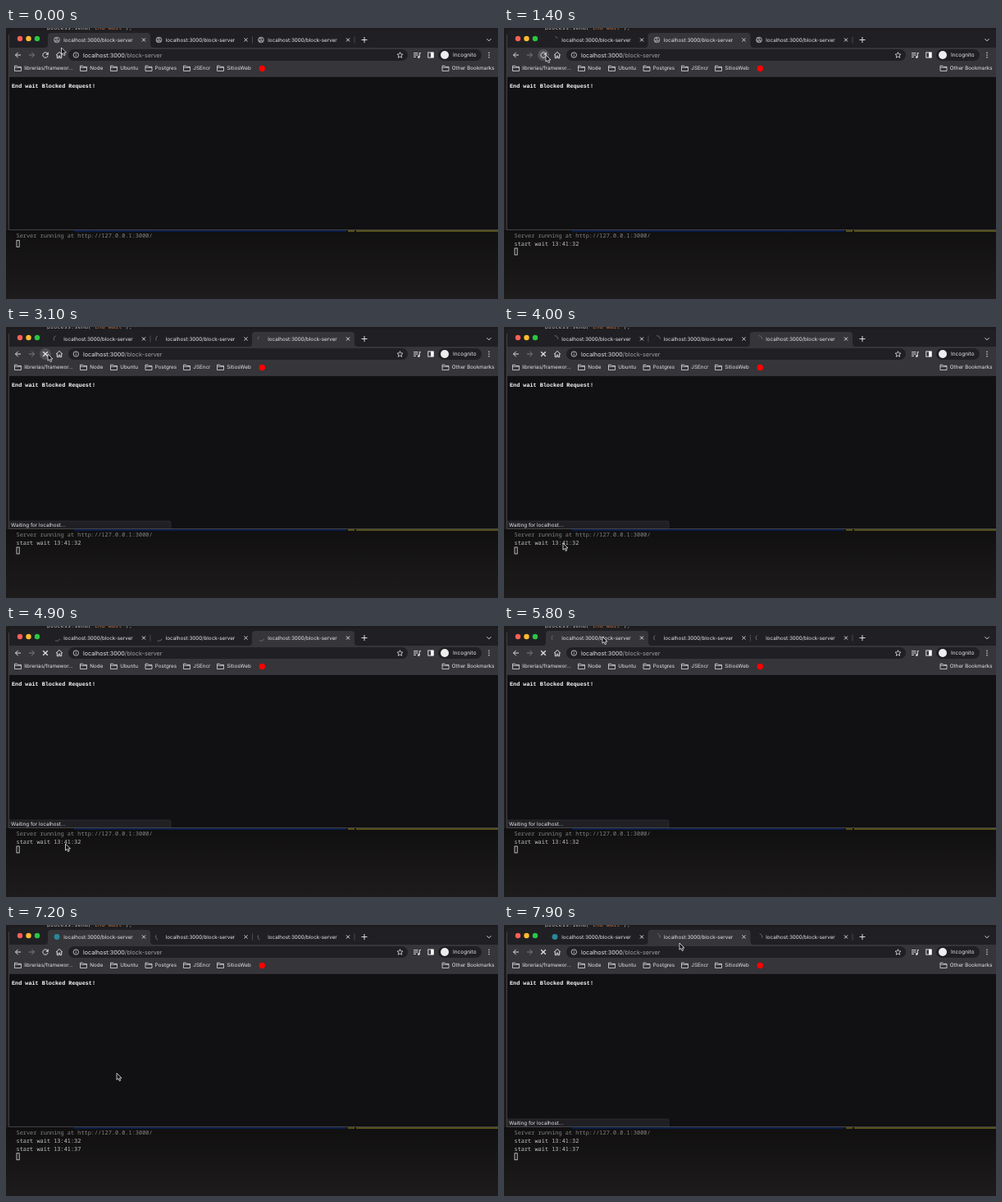
An HTML page that plays this animation: 600x331 px, repeating every 8000 ms.

```html
<!DOCTYPE html>
<html lang="en">
<head>
<meta charset="utf-8">
<title>Blocked requests</title>
<style>
  html, body { margin: 0; width: 100%; height: 100%; overflow: hidden; background: #1c1a1b; }
  svg { display: block; width: 100vw; height: 100vh; }
  text { font: 6.3px Inter, sans-serif; fill: #e6e6e8; white-space: pre; text-rendering: geometricPrecision; }
  .url { font-size: 7.2px; }
  .chip { font-size: 6.5px; }
  .page { font: bold 6.8px "Liberation Mono", monospace; fill: #fff; }
  .term { font: 6.93px "Noto Sans Mono", monospace; fill: #c4c2c3; }
  .line { fill: none; stroke: #dcdde0; stroke-width: 1; }
  .thin { stroke-width: .8; }
  .dim { stroke: #7c7d82; }
</style>
</head>
<body>
<svg viewBox="0 0 600 331" preserveAspectRatio="none">
  <defs>
    <linearGradient id="shade" x2="0" y2="1">
      <stop offset="0" stop-color="#000" stop-opacity=".42"/>
      <stop offset="1" stop-color="#000" stop-opacity="0"/>
    </linearGradient>
    <g id="folder">
      <path class="line thin" d="M.5 1.2h3l1 1.2h4v5.1h-8z"/>
      <path class="line thin" d="M.5 3.2h8"/>
    </g>
    <g id="globe">
      <circle r="3.8" fill="#8d9095"/>
      <path d="M-2.7-1.6 0-.7-.8.7-2 .6zM.7-2.7 2.7-1 2.2 1 .9.3zM-.7 1.3 1.3 1.7.3 3.1z" fill="#333439"/>
    </g>
    <path id="cross" class="line" d="M-2-2 2 2M2-2-2 2"/>
  </defs>

  <rect width="600" height="331" fill="#1d1b1c"/>
  <text class="term" x="50" y="2.4">process.send(<tspan fill="#b9754a">'End wait'</tspan>);</text>
  <rect y="247" width="600" height="84" fill="url(#shade)"/>
  <path d="M83 248H415" stroke="#0a1e4a" stroke-width="2"/>
  <path d="M417 248h8M427 248H600" stroke="#555019" stroke-width="2"/>
  <g id="terminal">
    <text class="term" x="12.5" y="256.3" style="fill:#858384">Server running at http://127.0.0.1:3000/</text>
    <text class="term" id="first" x="12.5" y="266.2">start wait 13:41:32</text>
    <text class="term" id="second" x="12.5" y="275.9">start wait 13:41:37</text>
    <rect id="caret" x="13" width="3.2" height="8" class="line thin"/>
  </g>

  <path d="M3.5 247V7q0-4.5 4.5-4.5H600V247z" fill="#202024"/>
  <g id="tabs"></g>
  <circle cx="17" cy="13" r="3.2" fill="#ff5f57"/>
  <circle cx="27.5" cy="13" r="3.2" fill="#febc2e"/>
  <circle cx="38" cy="13" r="3.2" fill="#28c840"/>
  <path class="line" d="M433.5 14.5h7M437 11v7M586.5 13.3l2.5 2.5 2.5-2.5"/>

  <rect x="4" y="24" width="596" height="35" fill="#35353a"/>
  <rect x="76" y="26" width="414" height="14" rx="7" fill="#202024"/>
  <rect x="527" y="26" width="53" height="14" rx="7" fill="#202024"/>
  <circle id="hover" cx="48" cy="33" r="7" fill="#515156"/>
  <path class="line" d="M18 33h-6.5m3.2-3.2L11.5 33l3.2 3.2"/>
  <path class="line dim" d="M28 33h6.5m-3.2-3.2 3.2 3.2-3.2 3.2"/>
  <g id="reload">
    <path class="line" d="M50.7 31.2A3.2 3.2 0 1 0 51.2 33.8"/>
    <path d="M51.8 29.3v3.5h-3.5z" fill="#dcdde0"/>
  </g>
  <use id="stop" href="#cross" transform="translate(48 33) scale(1.4)"/>
  <path class="line" d="M61 33.2 65 29.4l4 3.8M62.3 32.5v4.2h1.9v-2.5h1.6v2.5h1.9v-4.2"/>
  <circle class="line thin" cx="85.3" cy="33" r="3.2"/>
  <path class="line thin" d="M85.3 32.6v2.1M85.3 31.1v.8"/>
  <text class="url" x="94" y="35.5">localhost:3000<tspan fill="#a0a1a6">/block-server</tspan></text>
  <path class="line thin" d="M480.5 29.6l1 2.3 2.5.2-1.9 1.7.6 2.5-2.2-1.4-2.2 1.4.6-2.5-1.9-1.7 2.5-.2z"/>
  <path class="line" d="M497 30.7h5.5M497 33h5.5M497 35.3h3M504.3 35.6v-5h1.7"/>
  <circle cx="503.3" cy="35.6" r="1.3" fill="#dcdde0"/>
  <rect class="line" x="514.8" y="29.9" width="6.4" height="6.2"/>
  <rect x="518" y="29.9" width="3.4" height="6.2" fill="#fff"/>
  <circle cx="535" cy="33" r="5" fill="#eceded"/>
  <text class="chip" x="545" y="35.4">Incognito</text>
  <g fill="#dcdde0"><circle cx="589" cy="30.2" r=".8"/><circle cx="589" cy="33" r=".8"/><circle cx="589" cy="35.8" r=".8"/></g>
  <g id="bookmarks"></g>
  <circle cx="312.3" cy="49.5" r="3.7" fill="#f00"/>

  <rect x="4" y="59" width="596" height="187" fill="#111012"/>
  <path d="M4 59.3H600" stroke="#49494e" stroke-width=".7"/>
  <text class="page" x="7" y="72.7">End wait Blocked Request!</text>
  <g id="status">
    <path d="M4 237H199q2 0 2 2v7.5H4z" fill="#202024" stroke="#37373b" stroke-width=".6"/>
    <text x="6" y="244">Waiting for localhost...</text>
  </g>
  <path d="M3.5 8V246.5H600" fill="none" stroke="#4c4b4f" stroke-width=".8"/>
  <path id="pointer" d="M0 0V8.2L1.9 6.5 3.2 9.5 4.7 8.9 3.4 6H6z" fill="#111" stroke="#eee" stroke-width=".8"/>
</svg>
<script>
const LOOP = 8000, STEP = 100;
const $ = id => document.getElementById(id);

const bookmarks = [[10, "librerias/framewor..."], [90, "Node"], [127, "Ubuntu"], [169.5, "Postgres"],
  [216, "JSEncr"], [257, "SitiosWeb"], [531.5, "Other Bookmarks"]];
$("bookmarks").innerHTML = bookmarks.map(([x, label]) =>
  `<use href="#folder" x="${x}" y="45"/><text x="${x + 12.3}" y="51.4">${label}</text>`).join("");

$("tabs").innerHTML = [0, 1, 2].map(i => `<g transform="translate(${51 + i * 124.5})">
  <path class="shape" d="M-4 24q4 0 4-4V10q0-4 4-4H121q4 0 4 4v10q0 4 4 4z" fill="#35353a"/>
  <path class="edge" d="M125 10.5v8" stroke="#55555a" stroke-width=".8"/>
  <use class="globe" href="#globe" x="11" y="14.5"/>
  <circle class="done" cx="11" cy="14.5" r="3.4" fill="#2c8798"/>
  <path class="spinner" fill="none" stroke-width="1"/>
  <text x="19.2" y="16.7">localhost:3000/block-server</text>
  <use href="#cross" x="117" y="14.5"/></g>`).join("");

const tabs = [...$("tabs").children].map((group, i) => ({
  part: Object.fromEntries(["shape", "edge", "globe", "done", "spinner"].map(c => [c, group.querySelector("." + c)])),
  start: [1000, 1700, 2600][i],
  end: [6200, LOOP, LOOP][i]
}));

// Pointer path: time, x, y
const path = [[0, 67.5, 24], [100, 67.5, 24], [700, 51, 33], [3100, 51, 33], [3500, 80, 296],
  [3700, 80, 290], [4000, 72, 264], [4400, 88, 265], [4800, 72, 266], [5100, 74, 266],
  [5600, 119, 14], [5800, 120, 13], [6300, 82, 264], [6700, 82, 265], [7000, 90, 264],
  [7500, 218, 28], [7700, 222, 16], [7900, 214, 22], [LOOP, 214, 22]];

const show = (el, on) => el.setAttribute("visibility", on ? "visible" : "hidden");
const within = (t, a, b) => t >= a && t < b;

function pointerAt(t) {
  const i = path.findIndex(p => p[0] > t);
  const [t0, x0, y0] = path[i - 1], [t1, x1, y1] = path[i];
  const k = (t - t0) / (t1 - t0), e = k * k * (3 - 2 * k);
  return [x0 + (x1 - x0) * e, y0 + (y1 - y0) * e];
}

function arc(middle, sweep) {
  const point = a => {
    const r = a * Math.PI / 180;
    return `${11 + 3.8 * Math.sin(r)} ${14.5 - 3.8 * Math.cos(r)}`;
  };
  return `M${point(middle - sweep / 2)}A3.8 3.8 0 0 1 ${point(middle + sweep / 2)}`;
}

function activeAt(t) {
  if (t < 1300) return 0;
  if (t < 2300) return 1;
  if (t < 5600) return 2;
  return t < 7700 ? 0 : 1;
}

function draw(t) {
  const active = activeAt(t);
  const receiving = within(t, 6200, 6700);
  const angle = receiving ? 260 + (t - 6400) * .3 : -70 - 360 * (t - 3100) / 1320;

  tabs.forEach(({ part, start, end }, i) => {
    const loading = within(t, start, end);
    show(part.shape, i === active);
    show(part.edge, i !== active && i + 1 !== active);
    show(part.globe, t < start);
    show(part.done, t >= end);
    show(part.spinner, loading);
    part.spinner.setAttribute("d", arc(angle, Math.min(100, 20 + (t - start) / 12)));
    part.spinner.setAttribute("stroke", receiving ? "#4c86b0" : "#696a70");
  });

  const busy = within(t, tabs[active].start, tabs[active].end);
  show($("stop"), busy);
  show($("reload"), !busy);
  show($("status"), within(t, 1900, 2300) || within(t, 2800, 6700) || t >= 7700);
  show($("first"), t >= 1300);
  show($("second"), t >= 6200);
  $("caret").setAttribute("y", t < 1300 ? 259.3 : t < 6200 ? 269 : 278.8);

  const [x, y] = pointerAt(t);
  $("pointer").setAttribute("transform", `translate(${x} ${y})`);
  show($("hover"), Math.hypot(x - 48, y - 33) < 7);
}

const origin = performance.now();
function tick() {
  const t = (performance.now() - origin) % LOOP;
  draw(Math.floor(t / STEP) * STEP);
  requestAnimationFrame(tick);
}
tick();
</script>
</body>
</html>
```
